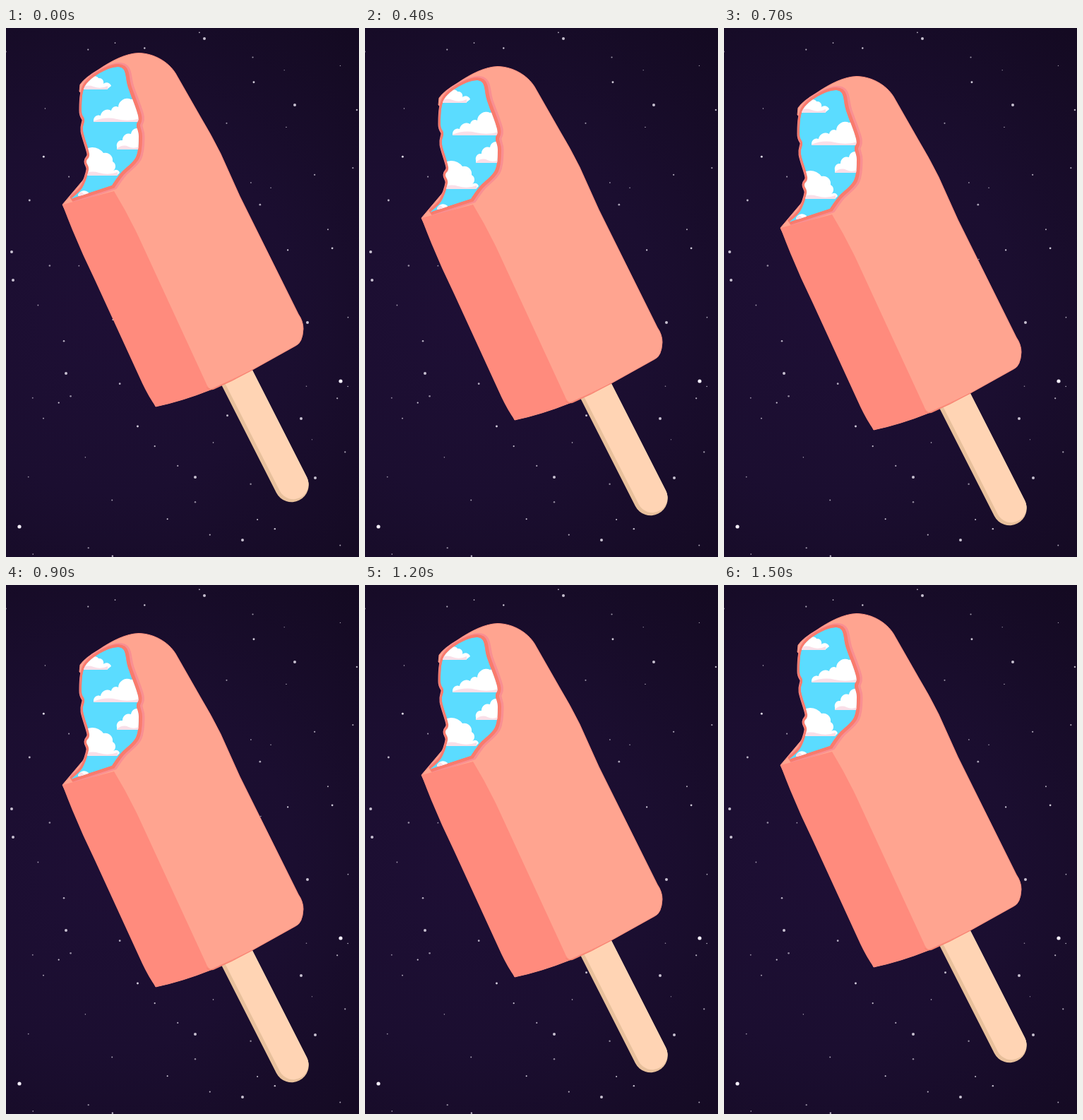
These frames come from a looping animation (500 by 749 pixels, 1.6 s). An HTML page:

```html
<!DOCTYPE html>
<html lang="en">
<head>
<meta charset="utf-8">
<title>Popsicle in space</title>
<style>
  html, body { margin: 0; width: 100%; height: 100%; overflow: hidden; background: #180d2b; }
  svg { display: block; width: 100vw; height: 100vh; }
  .line { fill: none; }
</style>
</head>
<body>
<svg viewBox="0 0 500 749" preserveAspectRatio="none">
  <defs>
    <radialGradient id="space" gradientUnits="userSpaceOnUse" cx="150" cy="400" r="520">
      <stop offset="0" stop-color="#1e0f35"/>
      <stop offset=".5" stop-color="#1b0e30"/>
      <stop offset="1" stop-color="#140a22"/>
    </radialGradient>
    <path id="bite"/>
    <clipPath id="hole"><use href="#bite"/></clipPath>
  </defs>
  <rect width="500" height="749" fill="url(#space)"/>
  <g id="stars" fill="#f4effa"></g>
  <g id="pop">
    <g class="line" stroke-linecap="round">
      <path d="M318,477 L404.5,647" stroke="#e8c09c" stroke-width="48.5"/>
      <path d="M320.5,475.7 L407,645.7" stroke="#ffd4b4" stroke-width="43"/>
    </g>
    <path id="front" fill="#ffa490" stroke="#ff9080" d="M80,250 L118,205 V100 L104,90 L105,80 Q112,70 131,59
      C150,46 170,36 188,35.5 C210,36 230,48 240,64 L276,127 Q290,150 304,178 L331,238 L414,405
      Q421,415 421,426 Q420,446 410,450 L349,484 L290,512 Q250,528 212,536 Z"/>
    <g class="line">
      <use href="#bite" x="2.5" stroke="#f98f92" stroke-width="12"/>
      <use href="#bite" x="1" stroke="#f97b6d" stroke-width="8"/>
    </g>
    <path id="side" fill="#ff8b7d" d="M80,250 Q116,241 153,231 Q172,262 188,296 L283,502 Q285,508 290,512
      Q250,528 212,536 Q202,522 193,503 L126,357 Q100,304 80,250 Z"/>
    <path class="line" stroke="#f88674" stroke-width="1.4" d="M284,509 Q288,513 294,511 L320,499 L349,484"/>
    <g id="sky" clip-path="url(#hole)"><use href="#bite" fill="#5bdcff"/></g>
  </g>
</svg>
<script>
const $ = id => document.getElementById(id);

function add(parent, tag, attrs) {
  const el = document.createElementNS('http://www.w3.org/2000/svg', tag);
  for (const k in attrs) el.setAttribute(k, attrs[k]);
  return parent.appendChild(el);
}

const points = text => text.split(' ').map(p => p.split(',').map(Number));

// Smooth curve through the points, closed by a straight line
function curve(text) {
  const p = points(text);
  let d = 'M' + p[0];
  for (let i = 0; i < p.length - 1; i++) {
    const a = p[i - 1] || p[i], b = p[i], c = p[i + 1], e = p[i + 2] || c;
    const out = b.map((v, j) => v + (c[j] - a[j]) / 6);
    const into = c.map((v, j) => v - (e[j] - b[j]) / 6);
    d += `C${out} ${into} ${c}`;
  }
  return d + 'Z';
}

$('bite').setAttribute('d', curve('92,242 108,226 117,201 114,189 118,178 109,146 111,130 107,117 ' +
  '112,82 140,60 165,57 173,84 187,124 185,138 188,154 184,183 163,205 150,223'));

// A cloud has a round puff between each two points and a flat, shaded base
function cloud(text) {
  const p = points(text);
  const [x, top] = p[0], [right, base] = p[p.length - 1];
  let d = `M${x},${base} V${top}`;
  for (let i = 1; i < p.length - 1; i++) {
    const r = 0.6 * Math.hypot(p[i][0] - p[i - 1][0], p[i][1] - p[i - 1][1]);
    d += `A${r},${r} 0 0 1 ${p[i]}`;
  }
  add($('sky'), 'path', { d: d + `L${right},${base}Z`, fill: '#fff' });
  const w = right - x;
  add($('sky'), 'path', {
    d: `M${x},${base} q${w / 4},-7 ${w / 2},-3 t${w / 2},-1 V${base + 1} H${x}Z`, fill: '#f9dfe8'
  });
}

cloud('104,78 121,71 131,71 138,79 149,82 144,86');
cloud('124,131 134,124 149,117 159,112 177,101 190,111 190,132');
cloud('157,168 165,159 177,150 190,143 190,171');
cloud('106,178 138,177 151,189 152,202 161,205 158,208');
cloud('102,236 117,233 116,237');

// Seeded random numbers
let seed = 11;
const rand = () => (seed = seed * 16807 % 2147483647) / 2147483647;

const star = (cx, cy, r, opacity) => add($('stars'), 'circle', { cx, cy, r, opacity });

// Faint stars: one at a random place in each cell
const cols = 8, rows = 10;
for (let i = 0; i < cols * rows; i++) {
  const x = (i % cols + rand()) * 500 / cols;
  const y = (Math.floor(i / cols) + rand()) * 749 / rows;
  star(x, y, 0.7 + 0.8 * rand(), 0.5 + 0.4 * rand());
}
// Bright stars
for (const [x, y] of points('8,317 10,357 427,417 438,637 335,725 85,489 268,636 409,109 281,15 418,553'))
  star(x, y, 2, 0.8);
for (const [x, y] of points('474,500 19,706')) star(x, y, 2.6, 1);

// Float down and up at an even pace, in held steps
const count = 16;
const steps = Array.from({ length: count + 1 }, (_, i) => {
  const y = Math.min(36, Math.round(4.74 * Math.min(i, count - i)));
  return { transform: `translateY(${y}px)`, offset: i / count, easing: 'steps(1, end)' };
});
$('pop').animate(steps, { duration: 1600, iterations: Infinity });
</script>
</body>
</html>
```
